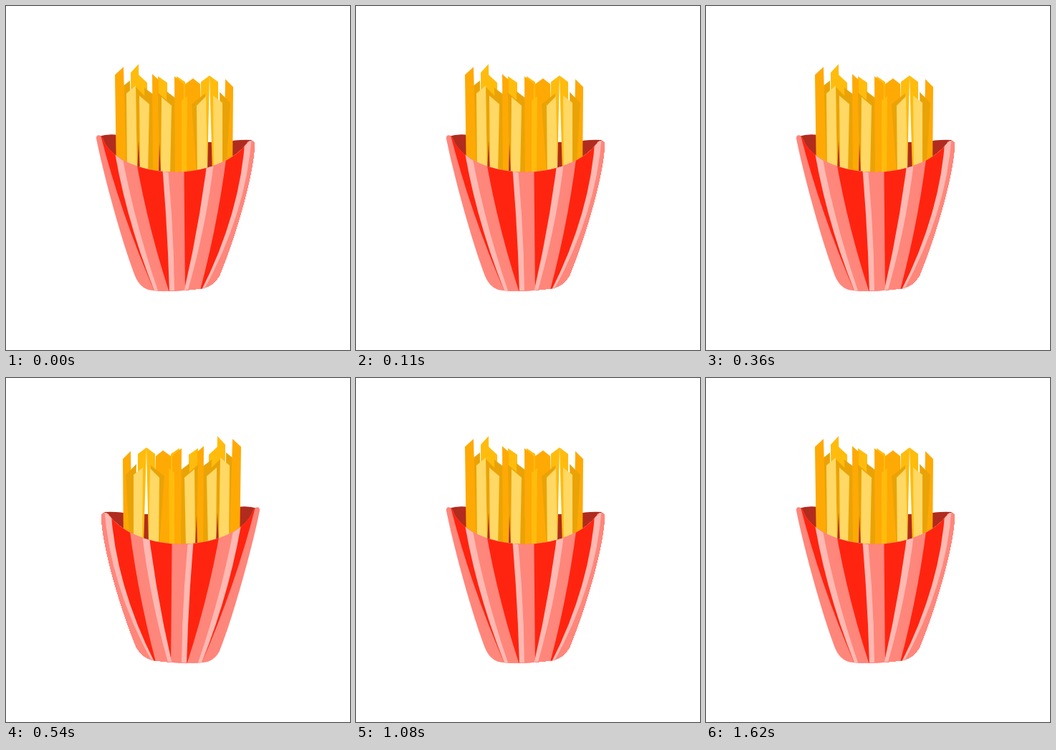
Recreate the animation shown at these times as an HTML page with a canvas. Size 480 by 480 pixels, loop 1.98 s.

```html
<!DOCTYPE html>
<html lang="en">
<head>
<meta charset="utf-8">
<title>Fries</title>
<style>
html, body { margin: 0; width: 100%; height: 100%; overflow: hidden; background: #fff; }
canvas { display: block; }
</style>
</head>
<body>
<canvas id="stage" width="480" height="480"></canvas>
<script>
const ctx = document.getElementById('stage').getContext('2d');
const LOOP = 1980;
const amber = '#eaa306', orange = '#ffa905', gold = '#ffbc0c', light = '#ffd865';
const red = '#ff2410', pale = '#ffb9b2', pink = '#ff867b', maroon = '#b12c1e';

// Each fry: two top corners, then the left and right x at its foot.
const backFries = [
  [amber, 163, 112, 173, 104, 164, 175],
  [gold, 184, 95, 197, 107, 184, 198],
  [gold, 174, 93, 185, 81, 175, 187],
  [orange, 152, 96, 164, 85, 154, 168],
  [amber, 193, 114, 205, 123, 196, 206],
  [gold, 212, 98, 225, 107, 214, 225],
  [orange, 204, 95, 213, 103, 205, 214],
  [amber, 224, 119, 237, 129, 226, 238],
  [gold, 238, 98, 250, 106, 240, 252],
  [orange, 235, 98, 248, 109, 236, 246],
  [orange, 250, 109, 261, 101, 250, 262],
  [orange, 261, 101, 271, 109, 260, 271],
  [gold, 272, 106, 284, 97, 268, 281],
  [gold, 284, 97, 296, 106, 288, 297],
  [orange, 306, 102, 317, 113, 304, 316]
];
const frontFries = [
  [amber, 181, 113, 200, 132, 183, 190],
  [light, 168, 122, 181, 111, 169, 183],
  [light, 186, 125, 200, 137, 187, 198],
  [amber, 212, 121, 231, 137, 214, 222],
  [light, 217, 127, 231, 139, 216, 229],
  [gold, 245, 132, 253, 126, 245, 252],
  [amber, 259, 137, 278, 122, 266, 278],
  [light, 266, 139, 279, 126, 267, 281],
  [amber, 298, 120, 313, 135, 301, 307],
  [light, 289, 125, 302, 135, 290, 302],
  [maroon, 185, 188, 185, 188, 183, 187],
  [maroon, 214, 192, 214, 192, 213, 216]
];

// Stripe edges: x at y = 180, 290 and 400; colours repeat red, pale, pink.
const edges = [
  [132, 165, 208], [148, 171, 208], [157, 180, 213],
  [176, 197, 228], [214, 223, 228], [221, 231, 235],
  [248, 249, 250], [285, 270, 248], [294, 279, 253],
  [311, 295, 270], [334, 315, 271], [343, 322, 274]
];

const inside = new Path2D(`M129 182 Q143 178 156 180 L160 190 H308
  Q321 186 343 187 L322 216 Q240 250 150 216 Z`);
const front = new Path2D(`M126 185 C125 179 133 178 136 187
  C142 203 170 231 238 232 C290 230 320 212 336 192
  C339 186 347 187 347 193 C345 240 319 325 298 376
  Q290 390 275 394 Q240 399 205 397 Q190 396 182 381
  C165 340 137 240 126 185 Z`);

function fill(color, path) {
  ctx.fillStyle = color;
  ctx.fill(path);
}

function drawFry([color, x1, y1, x2, y2, left, right]) {
  fill(color, new Path2D(`M${x1} ${y1} L${x2} ${y2} L${right} 234 H${left} Z`));
}

function drawStripe([top, mid, bottom], i) {
  const bend = 2 * mid - (top + bottom) / 2;
  const path = new Path2D(`M${top} 180 Q${bend} 290 ${bottom} 400 H480 V180 Z`);
  fill([red, pale, pink][i % 3], path);
}

function draw(now) {
  const t = now % LOOP;
  const flipped = (t >= 180 && t < 360) || (t >= 540 && t < 1080);
  ctx.setTransform(1, 0, 0, 1, 0, 0);
  ctx.fillStyle = '#fff';
  ctx.fillRect(0, 0, 480, 480);
  if (flipped) ctx.setTransform(-1, 0, 0, 1, 480, 0);

  fill(maroon, inside);
  backFries.forEach(drawFry);
  frontFries.forEach(drawFry);
  fill(pink, front);
  ctx.save();
  ctx.clip(front);
  edges.forEach(drawStripe);
  ctx.restore();
}

const start = performance.now();
function tick() {
  draw(performance.now() - start);
  requestAnimationFrame(tick);
}
tick();
</script>
</body>
</html>
```
